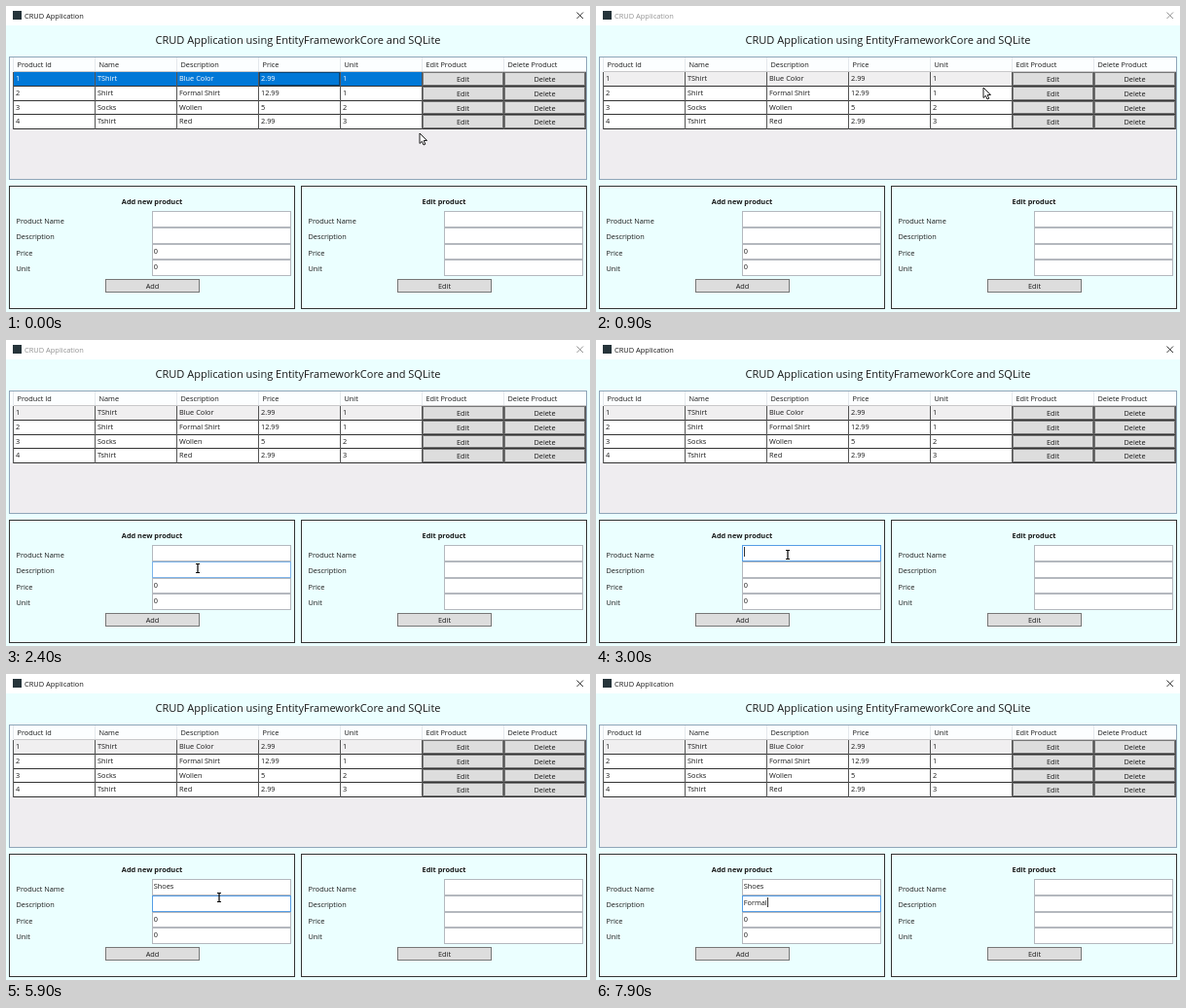
An HTML page with a canvas that plays this animation: 600 by 315 pixels, repeating every 8 s.

```html
<!DOCTYPE html>
<html lang="en">
<head>
<meta charset="utf-8">
<title>CRUD Application</title>
<style>
html, body { margin: 0; width: 100%; height: 100%; overflow: hidden; background: #ebffff; }
canvas { display: block; width: 600px; height: 315px; }
</style>
</head>
<body>
<canvas id="stage"></canvas>
<script>
const LOOP = 8000, STEP = 100;
const FONT = '"Open Sans", "Noto Sans", sans-serif';
const BACK = '#ebffff', INK = '#181818', LINE = '#333';
const canvas = document.getElementById('stage');
const ctx = canvas.getContext('2d');
const dpr = window.devicePixelRatio || 1;
canvas.width = 600 * dpr;
canvas.height = 315 * dpr;

const HEADERS = ['Product Id', 'Name', 'Description', 'Price', 'Unit', 'Edit Product', 'Delete Product'];
const ROWS = [
  ['1', 'TShirt', 'Blue Color', '2.99', '1'],
  ['2', 'Shirt', 'Formal Shirt', '12.99', '1'],
  ['3', 'Socks', 'Wollen', '5', '2'],
  ['4', 'Tshirt', 'Red', '2.99', '3']
];
const LABELS = ['Product Name', 'Description', 'Price', 'Unit'];
const colX = i => 8 + i * 84;
const rowY = i => Math.round(67.3 + i * 14.7);
const fieldY = i => Math.round(211.4 + i * 16.6);

// Pointer stops: time, x, y
const PATH = [
  [0, 425, 131], [400, 370, 89], [1000, 400, 84], [1500, 439, 74], [1700, 440, 77],
  [2400, 197, 235], [2800, 197, 221], [5400, 197, 221], [5900, 219, 230], [6300, 205, 237]
];
// Typed text with the time of each key
const TYPED = [
  { text: 'Shoes', keys: [4400, 4500, 4600, 4800, 5000] },
  { text: 'Formal', keys: [6900, 7100, 7300, 7500, 7700, 7900] }
];

function pointer(t) {
  let i = 0;
  while (i < PATH.length - 2 && t >= PATH[i + 1][0]) i++;
  const [t0, x0, y0] = PATH[i], [t1, x1, y1] = PATH[i + 1];
  const p = Math.min(1, (t - t0) / (t1 - t0));
  const e = p * p * (3 - 2 * p);
  const hidden = (t >= 4300 && t < 5500) || t >= 6900;
  return { x: Math.round(x0 + (x1 - x0) * e), y: Math.round(y0 + (y1 - y0) * e), hidden };
}

function rect(x, y, w, h, fill) {
  ctx.fillStyle = fill;
  ctx.fillRect(x, y, w, h);
}

function box(x, y, w, h, fill, stroke) {
  rect(x, y, w, h, stroke);
  rect(x + 1, y + 1, w - 2, h - 2, fill);
}

function text(str, x, y, { size = 7.35, color = INK, align = 'left', weight = 400 } = {}) {
  ctx.font = `${weight} ${size}px ${FONT}`;
  ctx.textAlign = align;
  ctx.fillStyle = color;
  ctx.fillText(str, x, y);
}

function inside(p, x, y, w, h) {
  return !p.hidden && p.x >= x && p.x < x + w && p.y >= y && p.y < y + h;
}

function button(label, x, y, w, h, p) {
  const hot = inside(p, x, y, w, h);
  box(x, y, w, h, hot ? '#bee6fd' : '#dddddd', hot ? '#3c7fb1' : '#777');
  text(label, x + w / 2, y + h / 2 + 3, { align: 'center' });
}

function titleBar(active) {
  rect(0, 0, 600, 20, '#fff');
  rect(7, 5, 9, 9, '#26343a');
  text('CRUD Application', 19, 13, { size: 7.45, color: active ? INK : '#929292' });
  ctx.strokeStyle = active ? '#222' : '#888';
  ctx.lineWidth = 0.9;
  ctx.beginPath();
  ctx.moveTo(586.5, 6.5); ctx.lineTo(593, 13);
  ctx.moveTo(593, 6.5); ctx.lineTo(586.5, 13);
  ctx.stroke();
}

function grid(selected, p) {
  box(3, 52, 594, 127, '#efedf0', '#8fa5b8');
  rect(4, 53, 592, 14, '#fcfeff');
  HEADERS.forEach((name, i) => {
    text(name, colX(i) + 3.5, 63);
    rect(colX(i) - 1, 53, 1, 14, '#e4e8ec');
  });
  rect(4, 67, 4, 59, '#f4f6f8');
  rect(8, 67, 588, 1, '#c8c8ca');
  ROWS.forEach((row, r) => {
    const y = rowY(r), h = rowY(r + 1) - y, blue = selected && r === 0;
    rect(8, y + 1, 420, h - 1, blue ? '#0078d7' : r === 0 ? '#f0eff0' : '#fff');
    row.forEach((cell, c) => text(cell, colX(c) + 2, y + 9.6, { color: blue ? '#fff' : INK }));
    button('Edit', 428, y + 1, 83, h - 1, p);
    button('Delete', 512, y + 1, 83, h - 1, p);
    rect(8, y + h, 588, 1, LINE);
  });
  for (let c = 0; c <= 7; c++) rect(colX(c) - 1, 68, 1, 59, '#555');
  if (selected) {
    ctx.setLineDash([1, 1]);
    ctx.lineWidth = 1;
    ctx.strokeStyle = '#111';
    ctx.strokeRect(260.5, 68.5, 82, 13);
    ctx.setLineDash([]);
  }
}

function form(x, title, action, values, focus, p) {
  box(x, 185, 294, 127, BACK, LINE);
  text(title, x + 147, 204, { align: 'center', weight: 700 });
  LABELS.forEach((name, i) => {
    const y = fieldY(i), h = fieldY(i + 1) - y, bx = x + 147;
    text(name, x + 7.5, 223.5 + i * 16.6);
    const hot = inside(p, bx, y, 143, h);
    box(bx, y, 143, h, '#fff', i === focus ? '#569de5' : hot ? '#7eb4ea' : '#b4b8be');
    text(values[i], bx + 1.7, y + 9.5);
  });
  button(action, x + 99, 281, 97, 14, p);
}

function caret(t, field, value) {
  // Each key press restarts the blink
  const starts = field === 0 ? [2800, ...TYPED[0].keys] : [6000, ...TYPED[1].keys];
  const last = Math.max(...starts.filter(s => s <= t));
  if (!isFinite(last) || (t - last) % 1060 >= 530) return;
  ctx.font = `7.35px ${FONT}`;
  rect(Math.round(151.7 + ctx.measureText(value).width), fieldY(field) + 2, 1, 10, '#333');
}

function drawPointer(p) {
  if (p.hidden) return;
  const overField = [3, 303].some(x => inside(p, x + 147, 211, 143, 67));
  ctx.save();
  ctx.translate(p.x, p.y);
  if (overField) {
    rect(-0.6, -5, 1.2, 10, '#000');
    rect(-2, -5, 4, 1, '#000');
    rect(-2, 4, 4, 1, '#000');
  } else {
    ctx.beginPath();
    [[0, 0], [0, 10.5], [2.4, 8.3], [4, 12], [5.8, 11.2], [4.2, 7.6], [7.5, 7.4]]
      .forEach(([x, y]) => ctx.lineTo(x, y));
    ctx.closePath();
    ctx.fillStyle = '#fff';
    ctx.fill();
    ctx.strokeStyle = '#000';
    ctx.lineWidth = 0.9;
    ctx.stroke();
  }
  ctx.restore();
}

function draw(t) {
  const p = pointer(t);
  const active = t < 200 || t >= 3000;
  const focus = t < 2800 ? -1 : t < 5800 ? 0 : 1;
  const [name, info] = TYPED.map(f => f.text.slice(0, f.keys.filter(k => k <= t).length));
  ctx.setTransform(dpr, 0, 0, dpr, 0, 0);
  rect(0, 0, 600, 315, BACK);
  titleBar(active);
  text('CRUD Application using EntityFrameworkCore and SQLite', 300, 39, { size: 11.02, align: 'center' });
  grid(t < 200, p);
  form(3, 'Add new product', 'Add', [name, info, '0', '0'], focus, p);
  form(303, 'Edit product', 'Edit', ['', '', '', ''], -1, p);
  if (focus >= 0) caret(t, focus, focus ? info : name);
  drawPointer(p);
}

const start = performance.now();
function tick() {
  const t = (performance.now() - start) % LOOP;
  draw(Math.floor(t / STEP) * STEP);
  requestAnimationFrame(tick);
}
tick();
</script>
</body>
</html>
```
